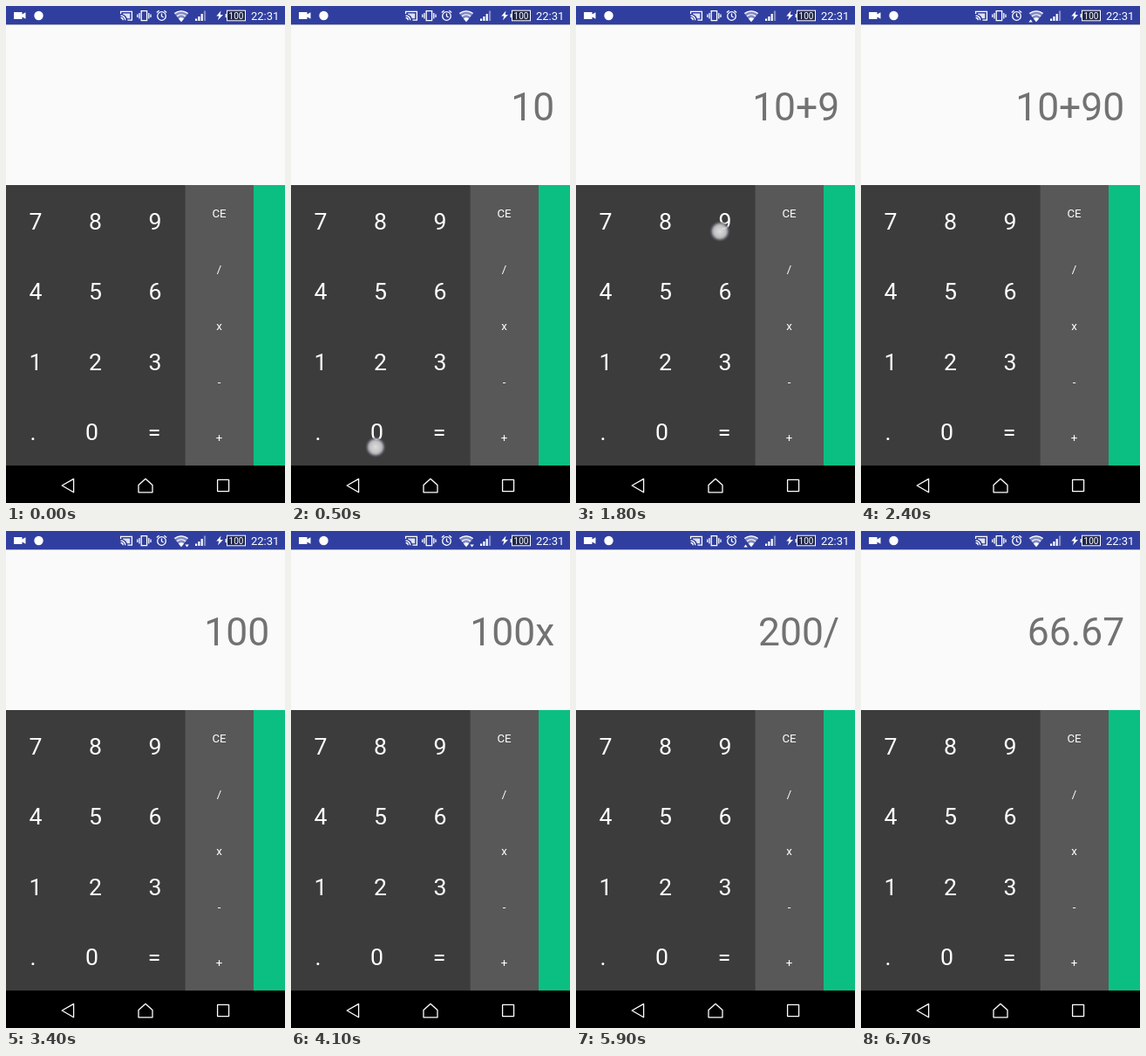
An HTML page that plays this animation: 320x569 px, repeating every 8000 ms.

```html
<!DOCTYPE html>
<html lang="en">
<head>
<meta charset="utf-8">
<title>Calculator</title>
<style>
  html, body { margin: 0; width: 100%; height: 100%; overflow: hidden; background: #000; }
  svg { display: block; width: 100vw; height: 100vh; }
  text { font-family: Roboto, sans-serif; fill: #fff; }
  #digits text { font-size: 26.7px; text-anchor: middle; }
  #operators text { font-size: 13.3px; text-anchor: middle; }
  #display { font-size: 44.4px; text-anchor: end; fill: #727272; }
  .line { fill: none; stroke: #fff; stroke-width: 1.3; }
</style>
</head>
<body>
<svg viewBox="0 0 320 569" preserveAspectRatio="none">
  <defs>
    <radialGradient id="glow">
      <stop offset="0" stop-color="#e6e6e6" stop-opacity=".95"/>
      <stop offset=".55" stop-color="#cfcfd0" stop-opacity=".9"/>
      <stop offset=".72" stop-color="#aaaab0" stop-opacity=".8"/>
      <stop offset=".82" stop-color="#6c6c7c" stop-opacity=".75"/>
      <stop offset="1" stop-color="#62626c" stop-opacity="0"/>
    </radialGradient>
  </defs>

  <rect width="320" height="21.5" fill="#303f9f"/>
  <rect y="21.3" width="320" height="184" fill="#fafafa"/>
  <rect y="205" width="205.5" height="321.5" fill="#3c3c3c"/>
  <rect x="205.3" y="205" width="79" height="321.5" fill="#585858"/>
  <rect x="284" y="205" width="36" height="321.5" fill="#0bbf83"/>

  <g id="status" fill="#fff">
    <path d="M9 7h9.5v2.6l4-2.4v7.6l-4-2.4V15H9z"/>
    <circle cx="37.5" cy="11" r="5.2"/>
    <!-- cast -->
    <path class="line" d="M131.6 9V6.4h12.8v9.8h-5M131.6 11a5.2 5.2 0 0 1 5.2 5.2M131.6 13.5a2.7 2.7 0 0 1 2.7 2.7"/>
    <path d="M134 8.4h8.2v5.8h-3.4a7 7 0 0 0-4.8-4.6z" opacity=".85"/>
    <!-- vibrate -->
    <path class="line" d="M155.2 5.7h6.4v11h-6.4zM153 8v6.5M163.8 8v6.5M150.8 9.5v3.5M166 9.5v3.5"/>
    <!-- alarm -->
    <g class="line"><circle cx="178.5" cy="11.5" r="4.8"/><path d="M178.5 8.5v3.2l2.2 1.3M172.8 7.6l2.8-2.3M184.2 7.6l-2.8-2.3"/></g>
    <!-- wifi -->
    <path d="M201 18.2L192.8 8.2a12.5 12.5 0 0 1 16.4 0z" opacity=".4"/>
    <path d="M201 18.2l-3.1-3.8a5 5 0 0 1 6.2 0z"/>
    <path class="line" d="M196 11.7a8 8 0 0 1 10 0M193.4 8.6a12 12 0 0 1 15.2 0"/>
    <path id="up" d="M192.4 18.6h4.4l-2.2-3z"/>
    <path id="down" d="M205.4 15.4h4.4l-2.2 3z"/>
    <!-- signal, charge -->
    <path d="M217 14.5h2.2V17H217zM220.3 12h2.2v5h-2.2zM223.6 9h2.2v8h-2.2z"/>
    <path d="M226.9 5.5h2.2V17h-2.2z" opacity=".4"/>
    <path d="M246.5 5.5l-5.2 6h3l-1.3 4.8 6-6.4h-3.3z"/>
    <path d="M251.6 9h1.6v4.2h-1.6z"/>
    <rect x="253.5" y="5.2" width="21" height="11.6" fill="#20264a" stroke="#fff"/>
    <text x="264" y="14.7" font-size="10" text-anchor="middle">100</text>
    <text x="281" y="15.8" font-size="13">22:31</text>
  </g>

  <text id="display" x="302.2" y="131.2"></text>
  <g id="digits"></g>
  <g id="operators"></g>
  <circle id="touch" r="12" fill="url(#glow)"/>

  <rect y="526.3" width="320" height="43" fill="#000"/>
  <path class="line" stroke-linejoin="round" d="M64.2 549L77.6 541.4v15.4zM160 541.2l8 7.4v8.2h-16v-8.2zM242.6 542.4h13v13.2h-13z"/>
</svg>
<script>
const LOOP = 8000;
const byId = id => document.getElementById(id);

function addLabel(group, label, x, y) {
  const node = document.createElementNS('http://www.w3.org/2000/svg', 'text');
  node.setAttribute('x', x);
  node.setAttribute('y', y);
  node.textContent = label;
  byId(group).append(node);
}

['789', '456', '123', '.0='].forEach((row, r) => {
  const columns = r === 3 ? [31, 98.5, 170] : [34, 102.5, 171];
  [...row].forEach((key, c) => addLabel('digits', key, columns[c], 256 + r * 80.4));
});
['CE', '/', 'x', '-', '+'].forEach((key, r) => addLabel('operators', key, 244.5, 242.2 + r * 64.2));

// Each press: start, end, finger position, resulting display
const presses = [
  [100, 400, 27, 415, '1'],
  [500, 800, 97, 505, '10'],
  [1200, 1400, 246, 505, '10+'],
  [1700, 1900, 165, 258, '10+9'],
  [2200, 2400, 92, 496, '10+90'],
  [2900, 3100, 166, 492, '100'],
  [3800, 4100, 244, 372, '100x'],
  [4300, 4500, 96, 413, '100x2'],
  [4700, 4900, 179, 495, '200'],
  [5700, 5900, 242, 314, '200/'],
  [6100, 6300, 165, 412, '200/3'],
  [6400, 6700, 164, 502, '66.67']
];

const show = (id, visible) => byId(id).setAttribute('visibility', visible ? 'visible' : 'hidden');
const within = (t, from, to) => t >= from && t < to;

function render(t) {
  const press = presses.findLast(([start]) => t >= start);
  byId('display').textContent = press ? press[4] : '';
  show('touch', press && t < press[1]);
  if (press) {
    byId('touch').setAttribute('cx', press[2]);
    byId('touch').setAttribute('cy', press[3]);
  }
  show('up', within(t, 2200, 3400) || within(t, 5400, 6400));
  show('down', within(t, 3400, 5400));
}

const origin = performance.now();
function tick() {
  render((performance.now() - origin) % LOOP);
  requestAnimationFrame(tick);
}
tick();
</script>
</body>
</html>
```
